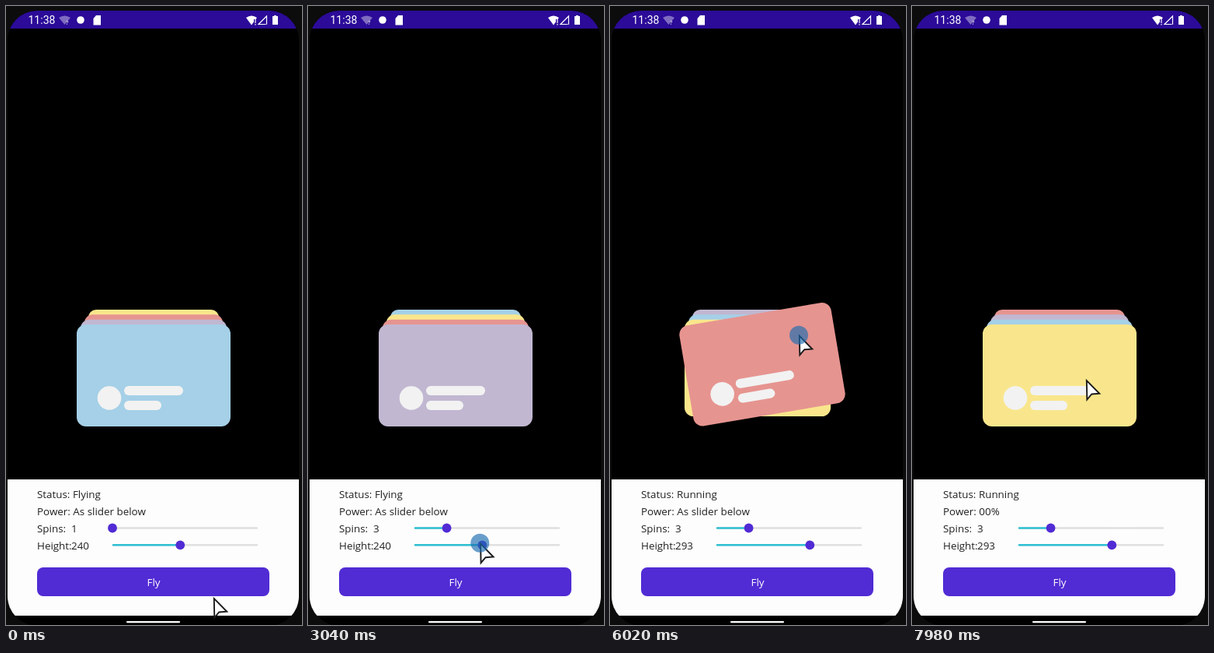
These frames come from a looping animation (381x795 px, 8000 ms). An HTML page:

```html
<!DOCTYPE html>
<html lang="en">
<head>
<meta charset="utf-8">
<title>Flying cards</title>
<style>
  html, body { margin: 0; width: 100%; height: 100%; overflow: hidden; background: #0c0c0c; }
  svg { display: block; width: 100%; height: 100%; }
  text { font: 13.4px "Open Sans", sans-serif; fill: #212121; white-space: pre; }
  .clock { font: 14px Roboto, sans-serif; fill: #fff; }
  .rail { stroke: #e0e0e0; stroke-width: 2.4; stroke-linecap: round; }
  .fill { stroke: #2fc0d2; stroke-width: 2.4; stroke-linecap: round; }
  .thumb { fill: #512bd4; }
</style>
</head>
<body>
<svg viewBox="0 0 381 795">
  <defs>
    <clipPath id="screen"><rect x="2" y="6" width="375" height="790" rx="38"/></clipPath>
    <clipPath id="sky"><rect y="29" width="381" height="579"/></clipPath>
    <clipPath id="buttonShape"><rect x="40" y="721" width="299" height="37" rx="8"/></clipPath>
  </defs>
  <g clip-path="url(#screen)">
    <rect width="381" height="795"/>
    <rect width="381" height="29" fill="#2b0b98"/>
    <rect y="608" width="381" height="175" fill="#fdfdfd"/>
    <rect x="155" y="790" width="69" height="2.2" rx="1" fill="#fff"/>
  </g>

  <g fill="#fff">
    <text class="clock" x="28.5" y="23">11:38</text>
    <path d="M68 15q7.500-5 15 0l-7.500 9z" opacity=".4"/>
    <text x="77" y="24" style="font-size:8px;fill:#fff">?</text>
    <circle cx="96" cy="18" r="4.800"/>
    <path d="M112.500 16l3.500-4h6v12.500h-9.500z"/>
    <path d="M309 15q7-5 14 0l-7 9.500z"/>
    <path d="M325 23.500h10.500V13z" fill="none" stroke="#fff" stroke-width="1.200"/>
    <path d="M320.500 17v5m0 1v1.500M335.500 16v5m0 1v1.500" stroke="#2b0b98" stroke-width="3"/>
    <path d="M321 17v5m0 1v1.500M335.500 16v5m0 1v1.500" stroke="#fff" stroke-width="1.200"/>
    <path d="M343 13h2v-1h3v1h2v11h-7z"/>
  </g>

  <g id="cards" clip-path="url(#sky)"></g>

  <text id="status" x="40" y="632"></text>
  <text id="power" x="40" y="654"></text>
  <text x="40" y="676">Spins:</text>
  <text x="40" y="697.500">Height:</text>
  <g id="sliders"></g>

  <g clip-path="url(#buttonShape)">
    <rect x="40" y="721" width="299" height="37" fill="#512bd4"/>
    <circle id="ripple" fill="#fff"/>
  </g>
  <text x="190" y="744.500" text-anchor="middle" style="fill:#fff">Fly</text>

  <path id="cursor" d="M.800 1L1.300 25.500L7.300 18.500L17.300 17.800Z" fill="#fff" stroke="#1b1b1b" stroke-width="1.900"/>
  <circle id="touch" r="12" fill="#1a6bb0" opacity=".65"/>
</svg>
<script>
const $ = id => document.getElementById(id);
const clamp = v => Math.min(1, Math.max(0, v));
const mix = (a, b, k) => a + (b - a) * k;

const LOOP = 8000, FLIGHT = 740;
const REST = { x: 190, y: 474.5 };
const COLORS = ['#a5d0e7', '#c1b7d1', '#e69490', '#f9e68c'];
const DRAG_START = 5940, DRAG_TILT = -15, GRAB = { x: 237, y: 437 };

// time, x, y
const CURSOR = [
  [0, 267, 760], [50, 267, 760], [230, 239, 746], [390, 239, 746], [460, 233, 743],
  [960, 233, 743], [1640, 190, 673], [2200, 190, 673], [2240, 195, 666], [2420, 195, 666],
  [2600, 137, 669], [2680, 137, 669], [2900, 179, 669], [3050, 224, 691], [3240, 256, 691],
  [3400, 256, 691], [3440, 257, 691], [3550, 257, 691], [3850, 226, 720], [4030, 226, 721],
  [5250, 226, 721], [5800, 237, 437], [5940, 237, 437], [6020, 243, 423],
  [6905, 255, 195], [7010, 253, 189], [7100, 253, 189], [7730, 218, 454], [7780, 218, 454],
  [7830, 224, 472], [7960, 224, 472], [7980, 224, 480]
];
const SPINS = [[2680, 1], [2900, 3]];
const HEIGHT = [[3050, 240], [3240, 291], [3400, 291], [3440, 293]];
const TOUCHES = [[660, 810], [2640, 2920], [3040, 3470], [4180, 4310], [5880, 6905]];
const CLICKS = [{ t: 810, x: 233, y: 743 }, { t: 4310, x: 226, y: 721 }];
const FLIGHTS = [
  { start: 920, peak: 224, spins: 1, from: { ...REST, tilt: 0 } },
  { start: 4410, peak: 168, spins: 3, from: { ...REST, tilt: 0 } },
  { start: 6905, peak: 137, spins: 3, from: { x: 208, y: 232.5, tilt: DRAG_TILT } }
];

// Linear interpolation through [time, ...values] keys
function track(keys, t) {
  const next = keys.findIndex(key => key[0] > t);
  if (next === 0) return keys[0].slice(1);
  if (next < 0) return keys[keys.length - 1].slice(1);
  const a = keys[next - 1], b = keys[next], k = (t - a[0]) / (b[0] - a[0]);
  return a.slice(1).map((v, i) => mix(v, b[i + 1], k));
}

$('cards').innerHTML = COLORS.map(color => `<g>
  <rect x="-99" y="-65.5" width="198" height="131" rx="12" fill="${color}"/>
  <g fill="#f2f2f2"><circle cx="-57" cy="29" r="15.3"/>
  <rect x="-38" y="13.500" width="76" height="12" rx="6"/>
  <rect x="-38" y="32.500" width="48" height="12" rx="6"/></g></g>`).join('');
const cardNodes = [...$('cards').children];

$('sliders').innerHTML = [[676, 670.5], [697.5, 692.3]].map(([base, y]) => `<g>
  <text x="84" y="${base}"></text>
  <path class="rail" d="M138 ${y}H323"/><line class="fill" x1="138" y1="${y}" y2="${y}"/>
  <circle class="thumb" cy="${y}" r="5.900"/></g>`).join('');
const [spinsSlider, heightSlider] = $('sliders').children;

function setSlider(node, value, min, max) {
  const [label, , fill, thumb] = node.children;
  const x = 137 + 187 * (value - min) / (max - min);
  label.textContent = Math.round(value);
  fill.setAttribute('x2', Math.max(138, x));
  thumb.setAttribute('cx', x);
}

const stackPose = level => ({
  x: REST.x, y: REST.y - 9.6 * level, scale: 1 - 0.05 * level, angle: 0, depth: level
});

function flightPose({ from, peak, spins }, p, advance) {
  const back = stackPose(3);
  const y = p < 0.5
    ? mix(from.y, peak, Math.sin(p * Math.PI))
    : mix(peak, back.y, (2 * p - 1) ** 4);
  return {
    x: mix(from.x, REST.x, advance), y,
    scale: mix(1, back.scale, p),
    angle: mix(from.tilt, 360 * spins, p),
    depth: p < 0.5 ? -1 : 4
  };
}

function dragPose(t, x, y) {
  const tilt = t < 6020 ? mix(0, -9.6, (t - DRAG_START) / 80)
    : mix(-9.6, DRAG_TILT, (t - 6020) / 885);
  return { ...stackPose(0), x: REST.x + x - GRAB.x, y: REST.y + y - GRAB.y, angle: tilt };
}

function drawCards(t, x, y) {
  const done = FLIGHTS.filter(f => t >= f.start + FLIGHT).length;
  const flight = FLIGHTS[done];
  const p = flight ? clamp((t - flight.start) / FLIGHT) : 0;
  const advance = clamp(p * 4);
  const dragging = t >= DRAG_START && t < FLIGHTS[2].start;
  const poses = COLORS.map((_, i) => {
    const level = (i - done + 4) % 4;
    if (level) return stackPose(level - advance);
    if (dragging) return dragPose(t, x, y);
    return p > 0 ? flightPose(flight, p, advance) : stackPose(0);
  });
  poses.forEach((o, i) => cardNodes[i].setAttribute('transform',
    `translate(${o.x} ${o.y}) rotate(${o.angle}) scale(${o.scale})`));
  [0, 1, 2, 3].sort((a, b) => poses[b].depth - poses[a].depth)
    .forEach(i => $('cards').append(cardNodes[i]));
}

function drawRipple(t) {
  const click = CLICKS.find(c => t >= c.t + 100 && t < c.t + 880);
  $('ripple').setAttribute('opacity', click ? 0.22 * clamp((click.t + 880 - t) / 400) : 0);
  if (!click) return;
  $('ripple').setAttribute('cx', click.x);
  $('ripple').setAttribute('cy', click.y);
  $('ripple').setAttribute('r', 200 * clamp((t - click.t - 100) / 225));
}

function powerText(t) {
  if (t < 6100) return 'As slider below';
  if (t >= FLIGHTS[2].start + FLIGHT) return '00%';
  return Math.round(32 * clamp((t - 6100) / 790)) + ' %';
}

function draw(t) {
  const [x, y] = track(CURSOR, t);
  const at = `translate(${x} ${y})`;
  $('cursor').setAttribute('transform', at);
  $('touch').setAttribute('transform', at);
  $('touch').setAttribute('visibility', TOUCHES.some(([a, b]) => t >= a && t < b) ? 'visible' : 'hidden');
  $('status').textContent = 'Status: ' + (t < 5900 ? 'Flying' : 'Running');
  $('power').textContent = 'Power: ' + powerText(t);
  setSlider(spinsSlider, track(SPINS, t)[0], 1, 10);
  setSlider(heightSlider, track(HEIGHT, t)[0], 100, 400);
  drawCards(t, x, y);
  drawRipple(t);
}

const began = performance.now();
function tick() {
  draw((performance.now() - began) % LOOP);
  requestAnimationFrame(tick);
}
tick();
</script>
</body>
</html>
```
